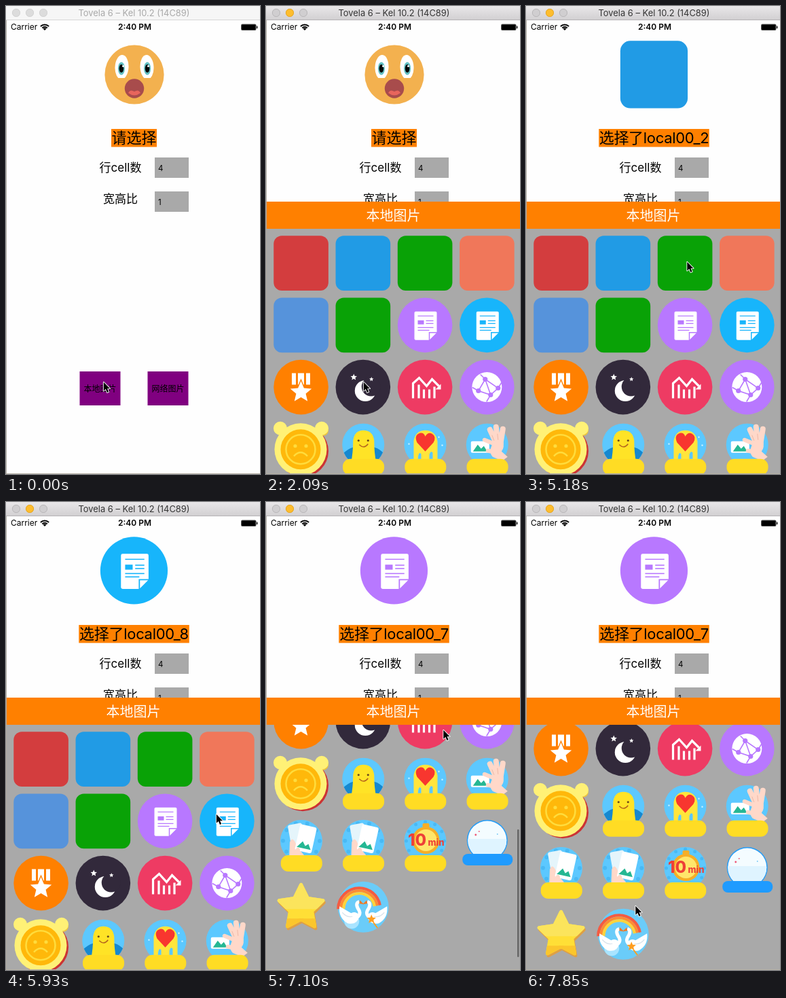
An HTML page with a canvas for the animation above (8 s loop, 374 px wide and 689 px high).

```html
<!DOCTYPE html>
<html lang="zh">
<head>
<meta charset="utf-8">
<title>Image picker</title>
<style>
html, body { margin: 0; width: 100%; height: 100%; overflow: hidden; background: #fff; }
canvas { display: block; width: 374px; height: 689px; }
</style>
</head>
<body>
<canvas id="stage" width="374" height="689"></canvas>
<script>
const g = document.getElementById('stage').getContext('2d');
const LOOP = 8000, TICK = 148.15;
const FONT = 'Inter, "Noto Sans CJK SC", "Noto Sans CJK", sans-serif';
const ORANGE = '#ff8000', GRAY = '#a9a9a9', PURPLE = '#b878ff', GREEN = '#09a206';

// ---- drawing helpers ----
function rect(x, y, w, h, color) { g.fillStyle = color; g.fillRect(x, y, w, h); }
function round(x, y, w, h, r, color) {
  g.beginPath(); g.roundRect(x, y, w, h, r);
  g.fillStyle = color; g.fill();
}
function oval(x, y, rx, ry, color, turn = 0) {
  g.beginPath(); g.ellipse(x, y, rx, ry, turn, 0, 7);
  g.fillStyle = color; g.fill();
}
function disc(x, y, r, color) { oval(x, y, r, r, color); }
function shape(d, color) { g.fillStyle = color; g.fill(new Path2D(d)); }
function line(d, color, width) {
  g.strokeStyle = color; g.lineWidth = width; g.stroke(new Path2D(d));
}
function ring(x, y, r, color, width) {
  g.beginPath(); g.arc(x, y, r, 0, 7);
  g.strokeStyle = color; g.lineWidth = width; g.stroke();
}
function star(x, y, r, color, inner = 0.45, soft = 0) {
  g.beginPath();
  for (let i = 0; i < 10; i++) {
    const a = i * Math.PI / 5 - Math.PI / 2, q = i % 2 ? r * inner : r;
    g.lineTo(x + q * Math.cos(a), y + q * Math.sin(a));
  }
  g.closePath(); g.fillStyle = color; g.fill();
  if (soft) {
    g.strokeStyle = color; g.lineWidth = soft; g.lineJoin = 'round'; g.stroke();
    g.lineJoin = 'miter';
  }
}
function text(s, x, y, size, color = '#000', align = 'center', weight = 400) {
  g.font = `${weight} ${size}px ${FONT}`;
  g.textAlign = align; g.fillStyle = color; g.fillText(s, x, y);
}
function clipped(makePath, draw) {
  g.save(); g.beginPath(); makePath(); g.clip(); draw(); g.restore();
}

// ---- icons, each in an 81 px cell ----
const tile = color => () => round(.3, .3, 80.6, 80.6, 12, color);
const dot = color => disc(40.6, 40.6, 40.3, color);

const page = color => () => {
  dot(color);
  g.save(); g.translate(0, 1.5);
  shape('M27 19H56Q58 19 58 21V50L47 61H27Q25 61 25 59V21Q25 19 27 19Z', '#fff');
  line('M58.5 50H47V61.5', color, 1.5);
  rect(30, 25, 23, 1.2, color);
  rect(30, 32, 9, 6, color);
  for (const [x, y, w] of [[42, 32, 11], [42, 36, 11], [30, 42, 23], [30, 46, 17]]) rect(x, y, w, 1.3, color);
  g.restore();
};

function medal() {
  dot(ORANGE);
  shape('M27 20H33V37H27ZM36 20H45V37H36ZM48 20H54V37H48Z', '#fff');
  star(40.5, 48, 20, ORANGE);
  star(40.5, 48, 16.5, '#fff');
}

function night() {
  dot('#32293b');
  disc(44, 46, 15.5, '#fff');
  disc(52.5, 40, 14, '#32293b');
  star(27, 26, 5, '#fff'); star(53, 29, 3.4, '#fff'); star(35, 35, 1.8, '#fff');
}

function chart() {
  dot('#ee3b63');
  line('M23 57V35L32 27L43 39L51 29L61 39M31.5 57V37M39 57V44M47 57V44M54.5 57V40', '#fff', 3.2);
  shape('M64 36V44H56Z', '#fff');
}

function network() {
  dot(PURPLE);
  disc(40.6, 40.6, 22, '#fff');
  line('M38 29L28 46L46 52L57 42L38 29L46 52M38 29L31 22M28 46L19 41M46 52L40 62M57 42L62 34', PURPLE, 1.6);
  for (const [x, y] of [[38, 29], [28, 46], [46, 52], [57, 42]]) disc(x, y, 3.6, PURPLE);
}

function coin() {
  disc(43, 43.5, 38, '#cc3333');
  disc(73, 13, 8, '#eec53c');
  disc(10, 10, 10, '#fff176'); disc(71, 10, 10, '#fff176');
  disc(40, 41, 38.5, '#fff176');
  disc(40, 41, 29.5, '#ffb80a');
  ring(40, 41, 21.5, '#ffdc3c', 2.6);
  disc(32, 36, 2.6, '#ffdc3c'); disc(48, 36, 2.6, '#ffdc3c');
  line('M30 51Q40 40 50 51', '#ffdc3c', 2.6);
}

const badge = draw => () => {
  disc(41, 34, 31, '#5cc8ff');
  clipped(() => g.arc(41, 34, 31, 0, 7), draw);
  round(10.8, 55, 61, 24, 11, '#ffdc24');
};

const friend = badge(() => {
  shape('M8 65V50Q18 40 26 38H57Q66 40 74 50V65Z', '#1688cf');
  shape('M23 60Q26 46 26 28Q28 13 41 13Q55 13 57 28Q57 46 60 60Z', '#ffe326');
  disc(34, 28, 1.6, '#69481c'); disc(48, 28, 1.6, '#69481c');
  line('M35 34Q42 41 48 33', '#b5651d', 1.5);
});

const heart = badge(() => {
  shape('M24 57V28Q27 13 41 13Q56 13 59 29V57H52V46Q49 42 47 49V57H35V48Q31 42 30 57Z', '#ffe53b');
  shape('M41 44L29 31Q24 20 33 17Q39 16 41 22Q45 15 51 18Q58 22 53 31Z', '#f8362f');
  for (const [x, y] of [[17, 33], [66, 35], [61, 23]]) disc(x, y, 1.2, '#c9f1ff');
});

function peaks(x, y) {
  shape(`M${x} ${y}l7 -10l5 6l4 -4l5 8Z`, '#25b793');
}

function snapshot() {
  disc(41, 34, 31, '#5cc8ff');
  round(17, 29, 27, 17, 2, '#fff');
  peaks(20, 44);
  g.lineCap = 'round';
  line('M56 36L45 12M57 34L54 8M60 36L64 11', '#ffd8c9', 8);
  line('M54 34L37 27M52 45L42 43', '#ffd8c9', 6);
  g.lineCap = 'butt';
  shape('M50 29L64 27Q67 38 62 44L71 52L63 58L49 52Q44 46 46 40Z', '#ffd8c9');
  line('M51 28L48 20M57 27L56 18', '#efb8a6', 1);
  round(10.8, 55, 61, 24, 11, '#ffdc24');
}

const cards = badge(() => {
  for (let i = 0; i < 10; i++) disc(41 + 27 * Math.cos(i * .63), 34 + 27 * Math.sin(i * .63), 3, '#49b9f4');
  g.save(); g.translate(33, 28); g.rotate(-.18); round(-9, -19, 21, 38, 3, '#e5f5fb'); g.restore();
  shape('M23 63L24 36Q27 28 31 34L36 44L45 55V66Z', '#ffd8c9');
  g.save(); g.translate(46, 31); g.rotate(.22);
  round(-11, -20, 25, 39, 3, '#fff'); peaks(-9, 14);
  g.restore();
  shape('M27 57Q34 40 38 45Q41 47 37 58Z', '#ffd8c9');
});

const timer = badge(() => {
  for (let i = 0; i < 12; i++) disc(41 + 28 * Math.cos(i * .524), 34 + 28 * Math.sin(i * .524), 2.5, '#49b9f4');
  round(37, 8, 10, 7, 2, '#f6ae27');
  disc(42, 33, 20, '#f6ae27'); disc(42, 33, 16, '#ffe66b');
  text('10', 29, 41, 24, '#ee4037', 'center', 800);
  text('min', 57, 41, 13, '#ee4037', 'center', 800);
});

function globe() {
  disc(41, 33, 30, '#239cf8');
  disc(41, 33, 28.5, '#f4fcff');
  clipped(() => g.arc(41, 33, 28.5, 0, 7), () => rect(10, 31, 62, 32, '#dff4ff'));
  disc(24, 25, 1.4, '#ef5776'); disc(29, 20, .9, '#ef5776'); disc(56, 24, .9, '#74c7f4');
  round(4.5, 53, 74, 17, 8, '#1f9bff');
}

function gold() {
  star(42, 44, 34, '#dfa044', .5, 5);
  star(40.6, 41, 34, '#ffdf36', .5, 5);
  clipped(() => g.rect(0, 0, 81, 43), () => star(40.6, 41, 34, '#fbe45c', .5, 5));
  clipped(() => g.rect(0, 57, 81, 24), () => star(40.6, 41, 34, '#fbc62c', .5, 5));
}

function swan(dir) {
  g.save(); g.translate(41 + dir * 14, 46); g.scale(dir, 1);
  shape('M-8 8Q-5 -1 4 3L21 -7Q23 10 9 18Q-5 21 -8 8Z', '#fff');
  line('M-5 9Q-12 4 -6 -4Q-2 -12 -8 -14', '#fff', 5);
  shape('M-9 -16L-15 -10L-8 -11Z', '#f07825');
  line('M2 8Q10 10 17 2', '#d8e3ec', 1.2);
  g.restore();
}

function swans() {
  disc(41, 40, 37.5, '#6accf9');
  ['#f45b42', '#ff8c34', '#ffd33c'].forEach((c, i) => {
    g.beginPath(); g.arc(35, 43, 31 - i * 4, Math.PI, 6.1);
    g.strokeStyle = c; g.lineWidth = 4.2; g.stroke();
  });
  disc(24, 61, 11, '#a9e4ff');
  swan(-1); swan(1);
  star(53, 58, 7, '#ff9d20');
  line('M56 63L62 71', '#ff9d20', 2);
}

const ICONS = [
  tile('#d33d3e'), tile('#219be5'), tile(GREEN), tile('#f0775a'),
  tile('#5693db'), tile(GREEN), page(PURPLE), page('#17b5fb'),
  medal, night, chart, network,
  coin, friend, heart, snapshot,
  cards, cards, timer, globe,
  gold, swans
];

function icon(i, x, y, size) {
  g.save(); g.translate(x, y); g.scale(size / 81.25, size / 81.25);
  ICONS[i]();
  g.restore();
}

// ---- motion, measured in ticks ----
const PATH = [
  [0, 143, 553], [15, 143, 553], [16, 112, 490], [18, 12, 390], [19, 62, 259], [20, 99, 276],
  [21, 99, 276], [23, 107, 281], [24, 150, 212], [26, 293, 285], [28, 220, 360], [29, 173, 380],
  [30, 152, 367], [32, 158, 370], [35, 236.5, 376], [36, 236.5, 376], [38, 309, 390], [39, 309, 459],
  [40, 309, 459], [42, 230, 465], [43, 225, 465], [46, 233.5, 590], [48, 260.5, 335],
  [49, 260.5, 337], [51, 225, 440], [53, 160.5, 594]
];
const PICKS = [[32, 2], [36, 3], [38, 4], [40, 8], [43, 7]];

function pointer(k) {
  const n = PATH.findIndex(p => p[0] > k);
  if (n < 0) return PATH[PATH.length - 1].slice(1);
  const [a, x, y] = PATH[n - 1], [b, u, v] = PATH[n];
  const f = (k - a) / (b - a);
  return [x + (u - x) * f, y + (v - y) * f];
}
function picked(k) {
  return PICKS.reduce((last, [at, id]) => k >= at ? id : last, 0);
}
function scrollAt(k) {
  if (k <= 46) return 0;
  if (k <= 48) return 119 * (k - 46);
  return Math.round(198 + 40 * Math.exp(-1.1 * (k - 48)));
}
function sheetTop(k) {
  const f = Math.min(1, Math.max(0, (k - 11.4) / 2.6));
  return 688 - 400 * f * f * (3 - 2 * f);
}

// ---- scene ----
function titleBar(active) {
  const fill = g.createLinearGradient(0, 0, 0, 20);
  fill.addColorStop(0, active ? '#e9e7e9' : '#f6f6f6');
  fill.addColorStop(1, active ? '#d2d0d2' : '#f6f6f6');
  rect(0, 0, 374, 20, fill);
  rect(0, 20, 374, 1, active ? '#b5b3b5' : '#d5d5d5');
  [15, 35, 55].forEach((x, i) => {
    const lit = active && i === 1;
    disc(x, 10, 6, lit ? '#fdbd2e' : active ? '#d0ced0' : '#dcdcdc');
    ring(x, 10, 5.6, lit ? '#dfa023' : active ? '#b3b1b3' : '#d0d0d0', .8);
  });
  text('Tovela 6 – Kel 10.2 (14C89)', 188.5, 15, 12.9, active ? '#343434' : '#a9a9a9');
}

function statusBar() {
  text('Carrier', 7, 35.3, 12, '#000', 'left');
  for (const r of [9.6, 6.2]) {
    g.beginPath(); g.arc(57, 36, r - 1, -2.36, -.78);
    g.strokeStyle = '#000'; g.lineWidth = 2; g.stroke();
  }
  shape('M57 36L54.4 33.2Q57 31.2 59.6 33.2Z', '#000');
  text('2:40 PM', 189.5, 35.3, 12, '#000', 'center', 600);
  round(346, 26.5, 22.5, 9.5, 2, '#555');
  round(347, 27.5, 20.5, 7.5, 1, '#000');
  rect(369, 29.5, 1.3, 3.5, '#000');
}

function face() {
  disc(189, 101, 43.6, '#f3b14f');
  for (const s of [-1, 1]) {
    const x = 189 + s * 18.5;
    clipped(() => g.rect(x - 12, 70, 24, 36), () => oval(x, 90, 10, 18, '#fff', s * -.05));
    oval(x + s * .6, 92, 5, 9.5, '#62bfc2');
    oval(x + s * .6, 92, 3.3, 6, '#050505');
    disc(x + 2, 88.5, 1.5, '#fff');
  }
  disc(189, 121.5, 14.2, '#a84c4c');
  shape('M180 128Q183 122 189 126Q195 122 198 128Q189 135 180 128Z', '#e8655c');
}

function form(id) {
  if (id) icon(id - 1, 138.5, 51, 100); else face();
  const w = id ? 162.5 : 67;
  rect(188.5 - w / 2, 181, w, 26.5, ORANGE);
  g.letterSpacing = id ? '-0.3px' : '0px';
  text(id ? '选择了local00_' + id : '请选择', 188.5, 202.3, 22);
  g.letterSpacing = '0px';
  text('行cell数', 168.5, 244, 17);
  text('宽高比', 168.5, 289.5, 17);
  rect(219, 223, 50, 30, GRAY); text('4', 224, 242.6, 11.5, '#000', 'left');
  rect(219, 273, 50, 30, GRAY); text('1', 224, 292.6, 11.5, '#000', 'left');
  ['本地图片', '网络图片'].forEach((s, i) => {
    rect(108.5 + i * 100, 538, 60, 50, '#800080');
    text(s, 138.5 + i * 100, 567.6, 12);
  });
}

function sheet(k) {
  const top = sheetTop(k), off = scrollAt(k);
  if (top >= 688) return;
  clipped(() => g.rect(1, top, 373, 688 - top), () => {
    rect(1, top, 373, 400, GRAY);
    ICONS.forEach((_, i) => {
      const y = top + 50 + Math.floor(i / 4) * 91.25 - off;
      if (y > top - 50 && y < 688) icon(i, 11 + i % 4 * 91.25, y, 81.25);
    });
    rect(1, top, 373, 40, ORANGE);
    text('本地图片', 187.5, top + 27.6, 20, '#fff');
    const fade = k < 47 ? 0 : Math.min(1, Math.max(0, (52 - k) / 2));
    if (fade) {
      const h = 228 - Math.max(0, off - 198);
      const y = Math.min(331 + 354 * off / 558, 685 - h);
      round(370, y, 2.5, h, 1.2, `rgba(0,0,0,${.4 * fade})`);
    }
  });
}

function arrow(x, y) {
  g.save(); g.translate(x + .8, y + .8); g.scale(.92, .92);
  const d = 'M0 0V14L3.3 11L5.6 16.5L8 15.5L5.7 10.2H10Z';
  g.lineJoin = 'round';
  line(d, '#fff', 2);
  shape(d, '#000');
  g.restore();
}

function draw(ms) {
  const k = Math.floor((ms % LOOP + 14) / TICK);
  rect(0, 0, 374, 689, '#fefefe');
  form(picked(k));
  statusBar();
  sheet(k);
  rect(0, 21, 1, 668, '#b3aea6');
  rect(0, 688, 374, 1, '#b8b3a8');
  titleBar(k >= 11);
  arrow(...pointer(k));
}

const start = performance.now();
function loop() {
  draw(performance.now() - start);
  requestAnimationFrame(loop);
}
loop();
</script>
</body>
</html>
```
